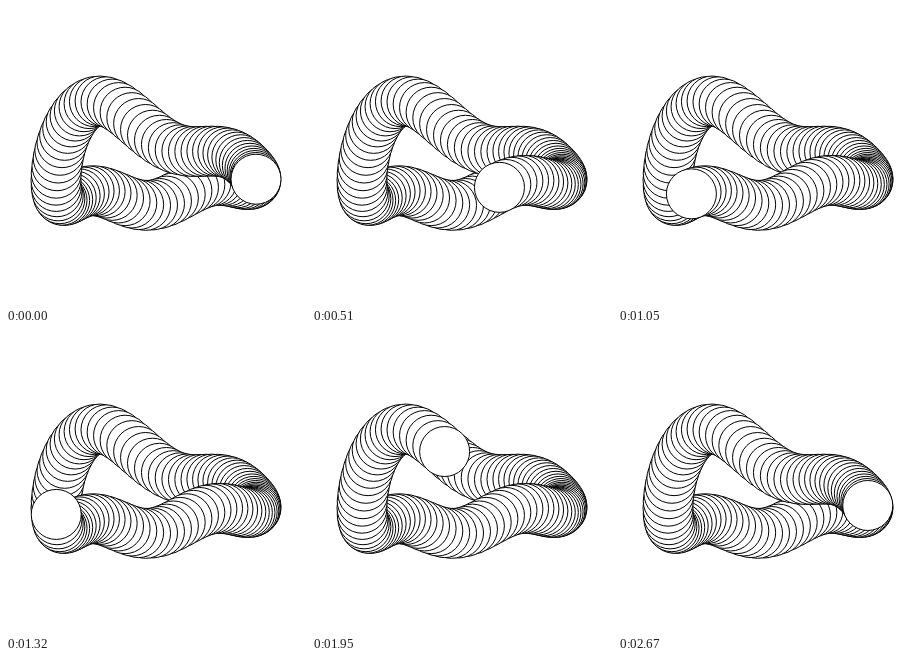
Animation, 300 px wide and 300 px high, one loop 2700 ms. Source, as an HTML page with a canvas:

```html
<!DOCTYPE html>
<html>
<head>
<meta charset="utf-8">
<style>
  html, body { margin: 0; width: 100%; height: 100%; overflow: hidden; background: #fff; }
  canvas { display: block; }
</style>
</head>
<body>
<canvas id="stage" width="300" height="300"></canvas>
<script>
const ctx = document.getElementById('stage').getContext('2d');
const { sin, cos, PI } = Math;
const STEPS = 90, STEP_MS = 30, RADIUS = 25;

// One ring of the tube; its centre follows a wavy closed path.
function ring(step) {
  const a = 2 * PI * step / STEPS;
  const x = 150 + 100 * cos(a);
  const y = 160.6 + 37.3 * sin(a + 0.165) + 17.2 * sin(2 * a + 2.77) + 8.3 * sin(3 * a - 0.92)
    + 8.9 * sin(4 * a + 1.42) + 1.5 * sin(5 * a) + 2.5 * sin(6 * a - 2.25);
  ctx.beginPath();
  ctx.arc(x, y, RADIUS, 0, 2 * PI);
  ctx.fill();
  ctx.stroke();
}

function draw() {
  const head = Math.floor(performance.now() / STEP_MS) % STEPS;
  ctx.fillStyle = '#fff';
  ctx.fillRect(0, 0, 300, 300);
  for (let age = STEPS - 1; age >= 0; age--) ring(head - age);
  requestAnimationFrame(draw);
}
draw();
</script>
</body>
</html>
```
